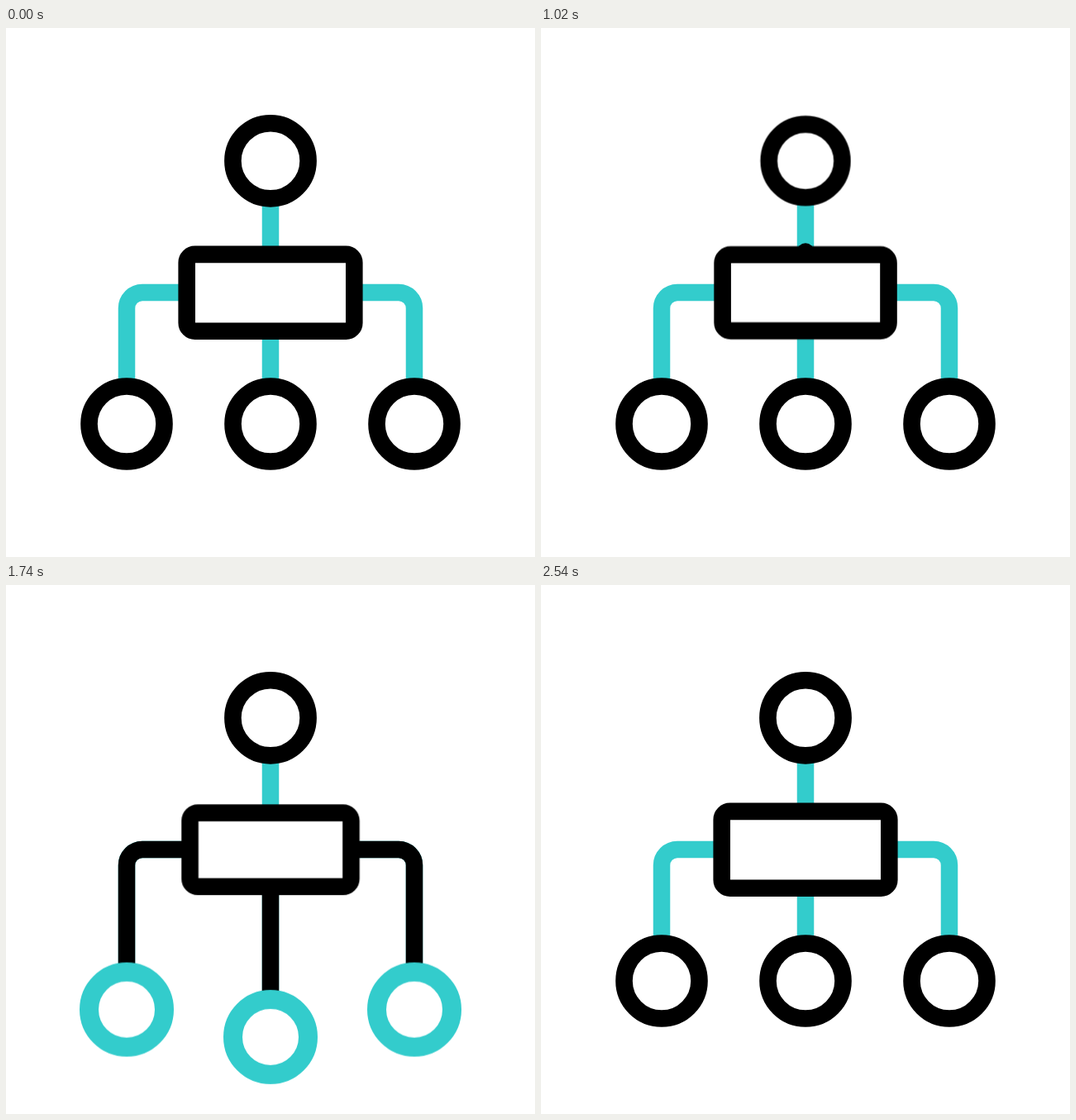
An HTML page without scripts that plays this animation: 640 px wide and 640 px high, repeating every 2800 ms.

```html
<!DOCTYPE html>
<html lang="en">
<head>
<meta charset="utf-8">
<title>Hierarchy</title>
<style>
  html, body { margin: 0; width: 100%; height: 100%; overflow: hidden; background: #fff; }
  svg { display: block; width: 100%; height: 100%; }

  .link { fill: none; stroke: #3cc; stroke-width: 20.5; }
  .flow { fill: none; stroke: #000; stroke-width: 20.5; }
  .node { fill: #fff; stroke: #000; stroke-width: 20.6; vector-effect: non-scaling-stroke; }
  .lit { fill: none; stroke: #3cc; stroke-width: 23; }
  .flow, .lit { stroke-dasharray: 1 2; stroke-dashoffset: 1.01; }

  .root, .box, .mid, .side, .flow, .lit { animation: 2.8s linear infinite; }
  .root { transform-origin: 320px 160.8px; animation-name: root; }
  .box { transform-origin: 320px 320.3px; animation-name: box; }
  .mid { animation-name: mid; }
  .side { animation-name: side; }
  .signal { stroke-linecap: round; animation-name: signal; }
  .branch { animation-name: branch; }
  .lit { animation-name: lit; }

  @keyframes root {
    0%, 5% { transform: scale(1); animation-timing-function: ease-in-out; }
    10.71% { transform: scale(.93); animation-timing-function: ease-in; }
    15.71% { transform: scale(1.037); animation-timing-function: ease-out; }
    23.9% { transform: scale(1.222); animation-timing-function: cubic-bezier(.17, 0, .25, 1); }
    40% { transform: scale(.964); animation-timing-function: ease-in-out; }
    60%, 100% { transform: scale(1); }
  }
  @keyframes box {
    0%, 26.43% { transform: scale(1); animation-timing-function: ease-in-out; }
    32.14% { transform: scale(.93); animation-timing-function: ease-in; }
    36.43% { transform: scale(.99); animation-timing-function: ease-out; }
    45% { transform: scale(1.22); animation-timing-function: cubic-bezier(.17, 0, .25, 1); }
    61.5% { transform: scale(.962); animation-timing-function: ease-in-out; }
    80%, 100% { transform: scale(1); }
  }
  @keyframes mid {
    0%, 42.86% { transform: translateY(0); animation-timing-function: ease-in; }
    50% { transform: translateY(33px); animation-timing-function: cubic-bezier(.35, .55, .65, 1); }
    66.5% { transform: translateY(71px); animation-timing-function: ease-in-out; }
    80.9% { transform: translateY(-15.5px); animation-timing-function: ease-in-out; }
    90.71%, 100% { transform: translateY(0); }
  }
  @keyframes side {
    0%, 42.86% { transform: translateY(0); animation-timing-function: ease-in; }
    50% { transform: translateY(13.5px); animation-timing-function: cubic-bezier(.35, .55, .65, 1); }
    66.5% { transform: translateY(36.5px); animation-timing-function: ease-in-out; }
    80.9% { transform: translateY(-11.5px); animation-timing-function: ease-in-out; }
    90.71%, 100% { transform: translateY(0); }
  }

  /* Each stroke draws in from its start, then its tail follows. */
  @keyframes signal {
    0%, 23% { stroke-dashoffset: 1.01; }
    30%, 31% { stroke-dashoffset: 0; }
    36.43% { stroke-dashoffset: -.583; }
    40%, 100% { stroke-dashoffset: -1.01; }
  }
  @keyframes branch {
    0%, 34.3% { stroke-dashoffset: 1.01; }
    42.2%, 67% { stroke-dashoffset: 0; }
    76%, 100% { stroke-dashoffset: -1.01; }
  }
  @keyframes lit {
    0%, 39% { stroke-dashoffset: 1.01; }
    43.6%, 71% { stroke-dashoffset: 0; }
    77%, 100% { stroke-dashoffset: -1.01; }
  }
</style>
</head>
<body>
<svg viewBox="0 0 640 640">
  <defs>
    <path id="stem" d="M320 200V320" pathLength="1"/>
    <path id="drop" d="M320 320V500" pathLength="1"/>
    <path id="arm" d="M320 320H165A19 19 0 0 0 146 339V500" pathLength="1"/>
    <circle id="ring" r="45.5" pathLength="1" transform="rotate(-90)"/>
  </defs>

  <g>
    <use href="#arm" class="link"/>
    <use href="#arm" class="flow branch"/>
    <g class="side">
      <use href="#ring" class="node" x="146" y="479"/>
      <use href="#ring" class="lit" x="146" y="479"/>
    </g>
  </g>

  <g transform="matrix(-1 0 0 1 640 0)">
    <use href="#arm" class="link"/>
    <use href="#arm" class="flow branch"/>
    <g class="side">
      <use href="#ring" class="node" x="146" y="479"/>
      <use href="#ring" class="lit" x="146" y="479"/>
    </g>
  </g>

  <use href="#drop" class="link"/>
  <use href="#drop" class="flow branch"/>
  <g class="mid">
    <use href="#ring" class="node" x="320" y="479"/>
    <use href="#ring" class="lit" x="320" y="479"/>
  </g>

  <use href="#stem" class="link"/>
  <use href="#stem" class="flow signal"/>
  <circle class="node root" cx="320" cy="160.8" r="45.6"/>
  <rect class="node box" x="218.7" y="273.9" width="202.6" height="92.8" rx="10"/>
</svg>
</body>
</html>
```
